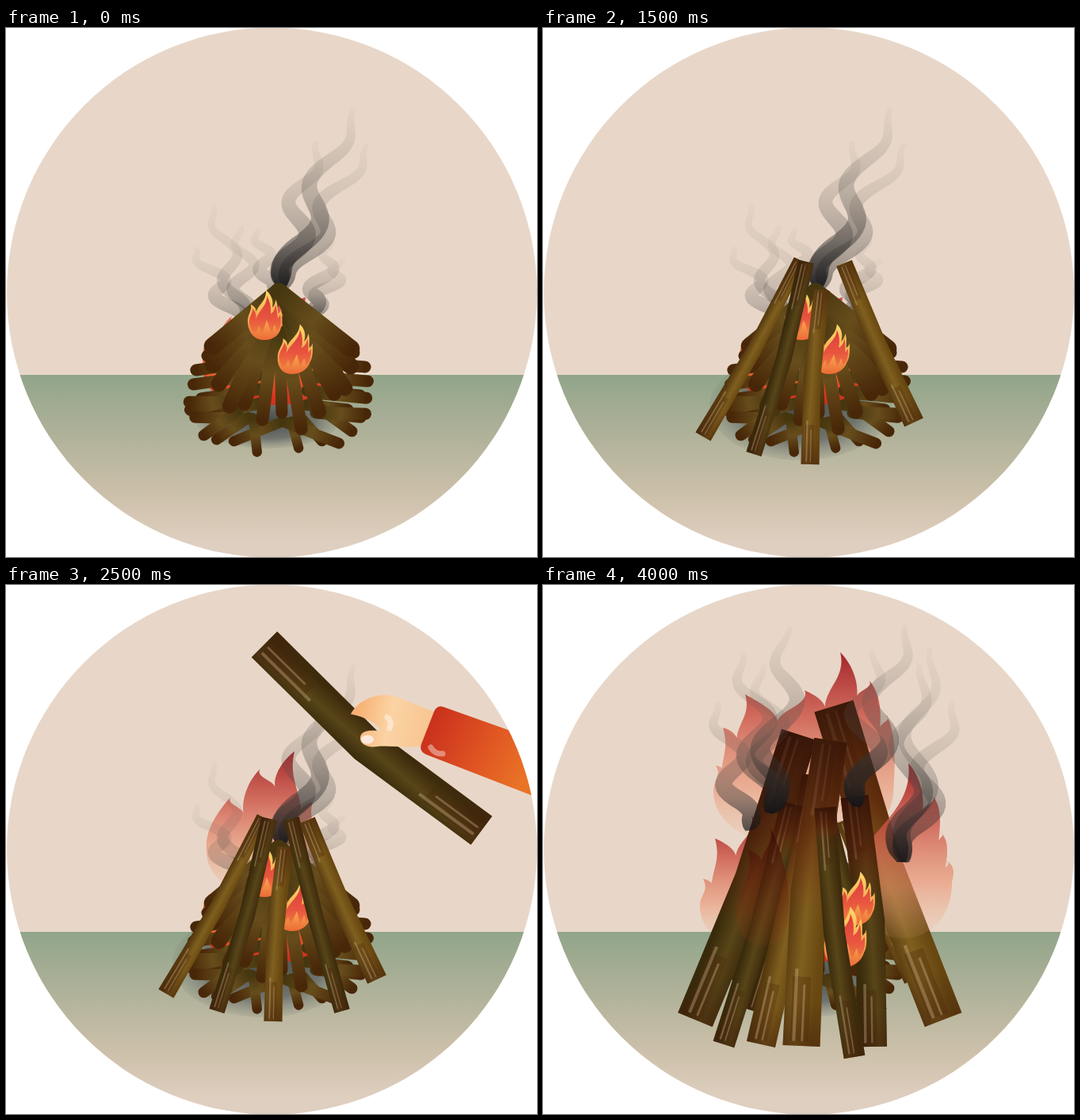
These frames come from a looping animation (670 by 668 pixels, 9000 ms). An HTML page:

```html
<!DOCTYPE html>
<html lang="en">
<head>
<meta charset="utf-8">
<title>Building a bonfire</title>
<style>
html, body { margin: 0; width: 100%; height: 100%; overflow: hidden; background: #fff; }
svg { display: block; width: 100%; height: 100%; }
</style>
</head>
<body>
<svg id="stage" viewBox="0 0 670 668" xmlns="http://www.w3.org/2000/svg"></svg>
<script>
const LOOP = 9000;
let defs = '', ids = 0;

const { sin, cos, abs, min, max, sign, hypot, PI } = Math;
const mix = (a, b, u) => [a[0] + (b[0] - a[0]) * u, a[1] + (b[1] - a[1]) * u];
const push = (p, n, d) => [p[0] + n[0] * d, p[1] + n[1] * d];
const normal = (a, b) => {
  const l = hypot(b[0] - a[0], b[1] - a[1]) || 1;
  return [(b[1] - a[1]) / l, (a[0] - b[0]) / l];
};
const xy = p => p.map(v => v.toFixed(1)).join(' ');
const poly = (pts, fill) => `<path d="M${pts.map(xy).join('L')}Z" fill="${fill}"/>`;
const series = (n, f) => Array.from({ length: n }, (_, i) => f(i / (n - 1), i));

// Linear gradient in stage units; stops are [offset, colour, opacity].
function grad(a, b, stops) {
  const id = 'g' + ids++;
  defs += `<linearGradient id="${id}" gradientUnits="userSpaceOnUse" x1="${a[0]}" y1="${a[1]}" x2="${b[0]}" y2="${b[1]}">` +
    stops.map(([o, c, k = 1]) => `<stop offset="${o}" stop-color="${c}" stop-opacity="${k}"/>`).join('') +
    '</linearGradient>';
  return `url(#${id})`;
}

// Layer visible from one time to another.
const layer = (from, to, ...parts) => `<g data-from="${from}" data-to="${to}">${parts.join('')}</g>`;

function stick(a, b, w) {
  const n = push(a, normal(a, b), .1);
  const c = grad(a, b, [[0, '#46360f'], [.5, '#674d1c'], [1, '#482708']]);
  return `<path d="M${xy(n)}L${xy(b)}" stroke="${c}" stroke-width="${w}" stroke-linecap="round"/>`;
}

// Log from top centre to foot centre; bow pushes its middle sideways, burn chars its top.
function log(x0, y0, x1, y1, w0, w1, bow, light, burn) {
  const top = [x0, y0], foot = [x1, y1];
  const n = normal(top, foot), mid = push(mix(top, foot, .5), n, bow);
  const wm = (w0 + w1) / 2;
  const ends = (p, m, w) => [push(p, m, -w / 2), push(p, m, w / 2)];
  const head = ends(top, normal(top, mid), w0);
  const belt = ends(mid, n, wm);
  const tail = ends(foot, normal(mid, foot), w1);
  const body = [...head, belt[1], tail[1], tail[0], belt[0]];
  const tone = light ? ['#56390f', '#80601f', '#684711'] : ['#382a0b', '#584518', '#3e2b0c'];
  const bark = grad(belt[0], belt[1], tone.map((c, i) => [i / 2, c]));
  const tips = grad(top, foot, [[0, '#42200b', .5], [.2, '#42200b', 0], [.85, '#42200b', 0], [1, '#42200b', .5]]);
  const strip = (e, u, w, v) => [[u, .03], [u + w, .03], [u + w, v], [u, v]]
    .map(q => mix(mix(...e, q[0]), mix(...belt, q[0]), q[1]));
  const marks = [head, tail].map(e =>
    poly(strip(e, .18, .5, .45), 'rgba(75,38,12,.3)') +
    poly(strip(e, .24, .09, .5), 'rgba(235,205,165,.3)') +
    poly(strip(e, .48, .06, .4), 'rgba(235,205,165,.3)')).join('');
  const soot = burn ? poly(body, grad([0, y0], [0, y0 + burn],
    [[0, '#300c06', .72], [.5, '#541608', .55], [1, '#8a3010', 0]])) : '';
  return poly(body, bark) + poly(body, tips) + marks + soot;
}

// Tongues of fire through the tips; dips between them follow from their spacing.
function blaze(x0, x1, base, lean, depth, tips, stops) {
  const p = [[x0, base]];
  tips.forEach((t, i) => {
    const next = tips[i + 1];
    p.push(t, next
      ? [(t[0] + next[0]) / 2 - lean * 3, max(t[1], next[1]) + 8 + abs(next[0] - t[0]) * .38]
      : [x1, base]);
  });
  let d = 'M' + xy(p[0]);
  for (let i = 1; i < p.length; i++) {
    const up = i % 2, tip = p[up ? i : i - 1], dip = p[up ? i - 1 : i];
    const round = up === (lean > 0 ? 1 : 0);
    const near = [dip[0] + (round ? lean * -3 : 0), mix(dip, tip, .4)[1]];
    const far = [tip[0] - lean * (round ? 12 : 8), mix(dip, tip, round ? .8 : .55)[1]];
    d += up ? `C${xy(near)} ${xy(far)} ${xy(tip)}` : `C${xy(far)} ${xy(near)} ${xy(dip)}`;
  }
  d += `C${x1} ${base + depth} ${x0} ${base + depth} ${x0} ${base}Z`;
  const peak = min(...tips.map(t => t[1]));
  return `<path d="${d}" fill="${grad([0, peak], [0, base + depth * .75], stops)}"/>`;
}
const RED = [[0, '#a01c22', .95], [.35, '#cd5546', .8], [.7, '#eb9270', .58], [1, '#f2b492', .08]];
const CHAR = [[0, '#300906', .75], [.45, '#681a0a', .45], [1, '#a84014', .08]];

// Smoke swaying along the line from base to tip, thinning as it rises.
function smoke(x0, y0, x1, y1, sway, w, dark) {
  const at = u => [
    x0 + (x1 - x0) * u + sway * sin(4 * PI * u - 2.8) * min(1, u * 4, (1 - u) * 4),
    y0 + (y1 - y0) * u];
  const left = [], right = [];
  series(49, u => {
    const n = normal(at(u - .01), at(u + .01));
    const half = (3 + (w / 2 - 3) * (1 - u * u)) * Math.sqrt(min(1, u * 12 + .15));
    left.push(push(at(u), n, half));
    right.unshift(push(at(u), n, -half));
  });
  return poly(left.concat(right), grad([0, y0], [0, y1],
    [[0, '#141416', dark], [.25, '#2f2d2c', dark * .62], [.6, '#5c5650', dark * .36], [1, '#8c8278', .05]]));
}
// Several plumes sharing a base; each tip is [x, y].
const plumes = (x, y, sway, w, dark, tips) =>
  tips.map(([tx, ty], i) => smoke(x + i * 3, y, tx, ty, sway, w - i * 2, dark * (1 - i * .18))).join('');

// Small bright flame standing at a point.
const glow = grad([0, -62], [0, 0], [[0, '#ffd768'], [.6, '#f7a850'], [1, '#ec6a36']]);
const heart = grad([0, -58], [0, -6], [[0, '#d93c3c'], [.6, '#e8553f'], [1, '#f0803f']]);
const flame = (x, y, s = 1, skew = 0) => `<g transform="translate(${x} ${y}) scale(${s}) skewX(${skew})">
<path d="M-21 -22C-22 -32 -15 -37 -17 -45Q-9 -41 -11 -34C-8 -45 3 -49 2 -63C9 -57 12 -49 10 -41Q14 -45 14 -51C18 -44 16 -37 18 -33Q21 -36 21 -39C23 -28 23 -19 21 -16C19 -6 11 0 0 0C-12 0 -20 -8 -21 -22Z" fill="${glow}"/>
<path d="M-19 -21C-20 -29 -14 -35 -15 -40Q-9 -34 -11 -26C-6 -39 4 -44 3 -56Q9 -46 8 -33C13 -36 13 -40 14 -45Q16 -38 17 -27L20 -32C22 -20 20 -15 16 -11L13 -20L9 -9L3 -25L-3 -8L-7 -18L-11 -8C-16 -11 -18 -16 -19 -21Z" fill="${heart}"/></g>`;

// Woodpile: side sticks, a ring on the ground and a tent leaning on the apex.
const sideSticks = series(5, (u, i) => {
  const y = 410 + i * 18, out = 18 * sin(i * .9);
  return stick([320, y - 8], [254 - out, y + 4], 15) + stick([380, y - 6], [439 + out, y], 15);
}).join('');
const ringSticks = series(14, (u, i) => {
  const a = PI * (1.02 - u * 1.04), b = a + .5 * sin(i * 2.3), c = cos(a);
  return stick([343 + 55 * cos(b), 474 + 24 * sin(b)],
    [343 + 112 * sign(c) * abs(c) ** .7, 476 + 60 * sin(a) - (i % 3) * 5], 12 + 3 * abs(c));
}).join('');
const tentSticks = series(13, (u, i) => {
  const k = (i % 2 ? 1 : -1) * (i + i % 2) / 12, side = abs(k);
  const a = PI * (.5 + k * .54), foot = [348 + 88 * cos(a), 414 + (72 + 12 * (i % 3)) * sin(a)];
  return stick(mix([344, 333], foot, .35 * (1 - side)), foot, 15 + 7 * side);
}).join('');
const embers =
  blaze(250, 425, 440, 1, 48, [[258, 389], [285, 364], [358, 328], [378, 340]],
    [[0, '#c9283a', .95], [.4, '#e8714c', .8], [.75, '#e4401f', .95], [1, '#d92813', .85]]) +
  blaze(254, 395, 440, 1, 42, [[264, 412], [290, 395], [326, 392], [364, 408]],
    [[0, '#ffc65d'], [.45, '#ef7437'], [1, '#d82a1a']]);

// Hand reaching in from the right, over a held log.
const flesh = grad([440, 165], [535, 185], [[0, '#f6b071'], [.45, '#fbd3a4'], [1, '#f8c591']]);
const cloth = grad([535, 170], [660, 235], [[0, '#c9301c'], [.5, '#de5122'], [1, '#ea7426']]);
const hand = `<path d="M435 163C446 143 474 132 500 144L540 160L524 203C508 207 484 202 468 204C455 206 446 200 447 192C449 182 462 184 474 184C468 175 452 166 435 163Z" fill="${flesh}"/>
<ellipse cx="456" cy="195" rx="8" ry="5.5" fill="#fbe9dd"/>
<path d="M552 154L690 203V276L530 214Q521 210 524 201L540 160Q544 151 552 154Z" fill="${cloth}"/>
<path d="M481 167Q488 172 484 181M536 205Q541 214 551 213" fill="none" stroke="#fff" stroke-width="7" stroke-linecap="round" opacity=".4"/>`;
const mirror = 'translate(168 173) rotate(-20) scale(-1 1) translate(-437 -161)';

const bigPair = burn =>
  log(323, 189, 192, 549, 46, 47, 8, false, burn) +
  log(367, 153, 505, 549, 51, 50, -8, true, burn);
const bigFront = burn => log(344, 241, 275, 580, 35, 37, 4, true, burn);
const leftFlames = blaze(244, 399, 415, -1, 55, [[259, 347], [284, 287], [333, 305], [368, 335]], CHAR);
const rightFlames = (x1, tips) => blaze(392, x1, 375, -1, 95, [[461, 225], [491, 266], [501, 312], ...tips], RED);

const shadow = (cx, cy, rx, ry) => `<ellipse cx="${cx}" cy="${cy}" rx="${rx}" ry="${ry}" fill="url(#shade)"/>`;
const ground = grad([0, 438], [0, 650], [[0, '#91a58a'], [.4, '#b3b39b'], [.75, '#cfc2ac'], [1, '#dfcfc0']]);

const art = '<g clip-path="url(#disc)"><rect width="670" height="668" fill="#e8d7c8"/>' +
  `<rect y="438" width="670" height="230" fill="${ground}"/>` +
  layer(0, 500, shadow(330, 496, 90, 35)) +
  layer(500, 3000, shadow(325, 478, 115, 68)) +
  layer(3000, LOOP, shadow(335, 494, 98, 52)) +
  layer(2000, 4000, blaze(253, 399, 335, 1, 75, [[284, 267], [321, 232], [364, 210], [387, 274]], RED)) +
  layer(0, 4000,
    plumes(345, 328, 17, 26, .75, [[439, 101], [391, 143], [456, 146]]),
    plumes(298, 374, -14, 18, .36, [[239, 277], [262, 223]]),
    plumes(385, 360, -12, 19, .42, [[413, 268], [426, 292]])) +
  layer(0, 2000, smoke(302, 372, 297, 250, -14, 18, .34), smoke(336, 334, 317, 253, -10, 18, .3)) +
  layer(3500, 4000,
    plumes(268, 325, -18, 27, .7, [[262, 95], [232, 162], [299, 103]]),
    blaze(305, 410, 205, 1, 60, [[327, 154], [357, 128], [391, 111], [413, 158]], RED),
    blaze(330, 368, 275, 1, 35, [[352, 216], [366, 212]], RED)) +
  layer(3000, 4000, rightFlames(499, [])) +
  layer(4000, LOOP,
    blaze(215, 442, 260, -1, 95,
      [[218, 228], [227, 180], [255, 138], [330, 133], [375, 85], [411, 120], [433, 164]], RED),
    blaze(198, 290, 405, -1, 60, [[202, 371], [217, 320], [263, 290]], RED)) +
  embers + sideSticks + ringSticks + tentSticks +
  layer(0, 4000, flame(326, 394), flame(361, 437, 1, -7)) +
  layer(1500, LOOP,
    log(324, 293, 202, 516, 16, 22, 4, true),
    log(332, 295, 266, 538, 20, 20, 5)) +
  layer(500, LOOP, log(352, 331, 337, 551, 20, 23, -5, true)) +
  layer(2000, LOOP, log(360, 295, 424, 538, 20, 20, -2)) +
  layer(1000, LOOP, log(380, 297, 468, 498, 21, 26, -3, true)) +
  layer(3000, 4000, bigPair(0)) +
  layer(3500, 4000, bigFront(0), leftFlames) +
  layer(4000, LOOP,
    bigPair(240), bigFront(160),
    rightFlames(516, [[508, 348]]),
    log(363, 196, 326, 582, 42, 47, -10, true, 220),
    log(393, 267, 415, 583, 35, 38, 9, false, 130),
    flame(392, 430, 1.08, -5), flame(378, 483, 1.22, -5),
    log(314, 276, 228, 580, 28, 28, 5, false, 70),
    log(356, 281, 393, 596, 27, 27, -7, false, 40),
    blaze(244, 310, 415, -1, 55, [[259, 335], [286, 305]], CHAR),
    plumes(285, 288, -20, 28, .72, [[311, 52], [252, 85], [278, 100]]),
    smoke(260, 310, 220, 148, -18, 24, .7),
    plumes(395, 280, 20, 26, .75, [[458, 50], [416, 82]]),
    plumes(452, 350, 20, 27, .75, [[475, 99], [517, 147], [488, 80]])) +
  layer(2500, 3000, log(326, 75, 600, 310, 46, 45, -13), hand) +
  layer(3500, 4000, log(245, 62, 60, 372, 45, 45, 14), `<g transform="${mirror}">${hand}</g>`) +
  '</g>';

defs += '<clipPath id="disc"><circle cx="335.5" cy="334" r="334.5"/></clipPath>' +
  '<radialGradient id="shade"><stop offset="0" stop-color="#45494a"/><stop offset=".65" stop-color="#55595a" stop-opacity=".7"/>' +
  '<stop offset="1" stop-color="#777c75" stop-opacity=".15"/></radialGradient>';

const stage = document.getElementById('stage');
stage.innerHTML = `<defs>${defs}</defs>${art}`;
const layers = [...stage.querySelectorAll('[data-from]')].map(el => ({
  el, from: +el.dataset.from, to: +el.dataset.to
}));

function draw(t) {
  for (const { el, from, to } of layers) {
    el.style.display = t >= from && t < to ? '' : 'none';
  }
}

function tick() {
  draw(performance.now() % LOOP);
  requestAnimationFrame(tick);
}
tick();
</script>
</body>
</html>
```
